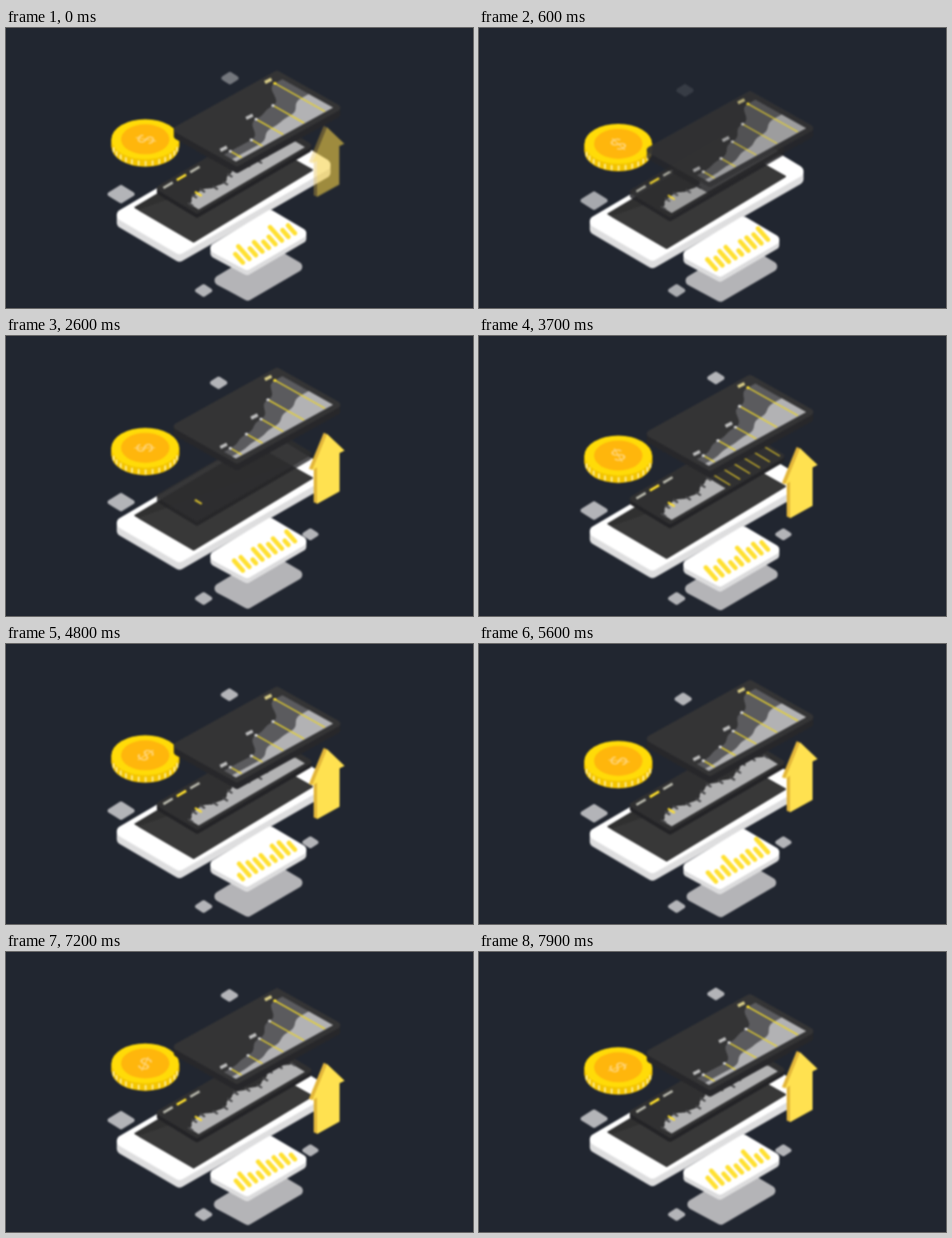
Animation, 560 px wide and 336 px high, one loop 8 s. Source, as an HTML page with a canvas:

```html
<!DOCTYPE html>
<html lang="en">
<head>
<meta charset="utf-8">
<title>Isometric phone</title>
<style>
  html, body { margin: 0; width: 560px; height: 336px; overflow: hidden; background: #212630; }
  canvas { display: block; filter: blur(.8px); }
</style>
</head>
<body>
<canvas id="stage" width="560" height="336"></canvas>
<script>
const c = document.getElementById('stage').getContext('2d');
const LOOP = 8000;
const ease = x => x * x * (3 - 2 * x);
const ramp = (t, a, b) => ease(Math.min(1, Math.max(0, (t - a) / (b - a))));
const wave = (t, crest, period) => Math.cos(2 * Math.PI * (t - crest) / period);
const range = (n, f) => Array.from({ length: n }, (_, i) => f(i));

function fade(alpha, draw, x = 0, y = 0) {
  if (alpha <= 0) return;
  c.save();
  c.globalAlpha *= alpha;
  c.translate(x, y);
  draw();
  c.restore();
}

function trace(points, r) {
  const n = points.length, [a, b] = [points[n - 1], points[0]];
  c.moveTo((a[0] + b[0]) / 2, (a[1] + b[1]) / 2);
  points.forEach((p, i) => c.arcTo(...p, ...points[(i + 1) % n], r));
  c.closePath();
}

function poly(points, fill, r = 0) {
  c.beginPath();
  trace(points, r);
  c.fillStyle = fill;
  c.fill();
}

// Extruded shape; its side is one path, so it stays even when translucent.
function slab(points, depth, face, side, r = 0, dx = 0, dy = 1) {
  c.beginPath();
  for (let d = depth; d > 0; d--) trace(points.map(([x, y]) => [x + d * dx, y + d * dy]), r);
  c.fillStyle = side;
  c.fill();
  poly(points, face, r);
}

function line(a, b, color, width) {
  c.beginPath();
  c.moveTo(...a);
  c.lineTo(...b);
  c.strokeStyle = color;
  c.lineWidth = width;
  c.stroke();
}

function oval(x, y, rx, ry, fill) {
  c.beginPath();
  c.ellipse(x, y, rx, ry, 0, 0, 7);
  c.fillStyle = fill;
  c.fill();
}

const plane = (o, U, V) => (u, v) => [o[0] + u * U[0] + v * V[0], o[1] + u * U[1] + v * V[1]];
const quad = (at, end = 1) => [at(0, 0), at(end, 0), at(end, 1), at(0, 1)];

// Filled curve over the base edge, level at each sample point.
function area(at, us, vs, fill, base) {
  c.beginPath();
  c.moveTo(...at(.04, base));
  c.lineTo(...at(.04, vs[0]));
  us.forEach((u, i) => {
    if (!i) return c.lineTo(...at(u, vs[0]));
    const mid = (us[i - 1] + u) / 2;
    c.bezierCurveTo(...at(mid, vs[i - 1]), ...at(mid, vs[i]), ...at(u, vs[i]));
  });
  c.lineTo(...at(.95, vs[vs.length - 1]));
  c.lineTo(...at(.95, base));
  c.fillStyle = fill;
  c.fill();
}

function tile(x, y, w, h, alpha) {
  fade(alpha, () => poly([[-w, 0], [0, -h], [w, 0], [0, h]], '#b3b4b8', 2.5), x, y);
}

function coin(t) {
  for (let d = 9; d > 0; d--) oval(0, d, 40.5, 24, '#f3c400');
  for (let a = .3; a < 2.9; a += .21) {
    const x = 40 * Math.cos(a), y = 24 * Math.sin(a);
    line([x, y + 2], [x, y + 8], '#fff0a0', 2);
  }
  oval(0, 0, 40.5, 24, '#ffdb08');
  oval(0, 0, 29, 18, '#ffb60c');
  c.scale(1, .68);
  c.rotate((t - 4050) * .0011);
  c.font = '27px Inter, Arial, sans-serif';
  c.textAlign = 'center';
  c.textBaseline = 'middle';
  c.fillStyle = '#ffd477';
  c.fillText('$', 0, 1);
}

function phone() {
  slab([[126, 241], [313, 131], [396, 181], [208, 289]], 9, '#fff', '#dededf', 7);
  poly([[153, 232], [297, 146], [369, 187], [225, 274]], '#303030', 1);
  poly([[158, 235], [339, 171], [369, 187], [225, 274]], '#383838', 1);
}

const CARD = [[-64, 11], [14, -36], [63, -7], [-14, 38]];

function card(t) {
  slab(CARD, 6, '#fff', '#dcdcdd', 6);
  c.lineCap = 'round';
  for (let i = 0; i < 9; i++) {
    const x = -19 + i * 7.8, y = 28 - i * 4.4;
    const h = 12 + 4 * Math.sin(i * 2.4 + t / 420) + 3 * Math.sin(i * 1.3 - t / 650);
    line([x, y], [x - h * .75, y - h * .85], '#ffe031', 5.4);
  }
  c.lineCap = 'butt';
}

const layerAt = plane([229, 226], [140, -82], [-51, -31]);
const layerU = range(13, i => .04 + i * .076);
const layerV = layerU.map(u => .33 + .12 * u + .08 * wave(u, .16, .33));

function layer(ink, wipe, grid) {
  const at = layerAt;
  slab(quad(at), 5, '#303031', '#232326', 3);
  fade(ink, () => {
    for (let i = 0; i < 3; i++) {
      const u = .04 + i * .115;
      line(at(u, .9), at(u + .08, .9), i === 1 ? '#ffe02d' : '#b9b9ad', 3);
    }
  });
  fade(grid, () => {
    for (let u = .46; u < 1; u += .085)
      if (u > wipe) line(at(u, .08), at(u, .5), '#cdb52b', 1.5);
  });
  c.save();
  c.beginPath();
  trace(quad(at, wipe), 0);
  c.clip();
  area(at, layerU, layerV, '#b3b3b4', .07);
  layerU.forEach((u, i) => line(at(u, layerV[i] + .04), at(u, layerV[i] - .08), '#48484a', 2.5));
  c.restore();
  line(at(.15, .46), at(.15, .3), '#ffe02d', 2.5);
}

const panelAt = plane([277, 167], [128, -71], [-80, -45]);
const panelU = range(5, i => .1 + i * .195);

function panel(t, grow) {
  const at = panelAt;
  const sway = .06 * wave(t, 4800, 3100);
  const values = panelU.map((_, i) =>
    grow * (.26 + .58 * (i / 4) ** 1.7 + (i % 4 ? sway * (-1) ** i : 0)));
  slab(quad(at), 8, '#343435', '#27272a', 4);
  area(at, panelU, values, '#5b5b5e', .08);
  area(at, panelU, values.map(v => v * .53), '#b2b2b4', .08);
  values.forEach((v, i) => {
    const [x, y] = at(panelU[i], v), top = i === 4;
    line([x, y], at(panelU[i], .09), '#ead42c', 1.5);
    oval(x, y, 2, 1.7, top ? '#ffe22e' : '#d8d8d8');
    if (i % 2 === 0) line([x - 12, y - 1], [x - 4, y - 5], top ? '#d6ca85' : '#bdbdbd', 4);
  });
}

function arrow() {
  const front = [[385, 0], [406, 20], [400, 23], [400, 69], [373, 84], [373, 40], [367, 44]];
  slab(front, 4, '#ffe150', '#e3b63a', 0, -1, -.4);
}

function draw(now) {
  const t = now % LOOP, closing = t < 1150;
  const late = closing ? t + LOOP : t;   // closing carries on from the end of the loop
  const shown = (a, b, d, e) => closing ? 1 - ramp(t, a, b) : ramp(t, d, e);
  const open = shown(450, 1050, 1300, 2000);
  const lift = (-11.7 - 5.2 * wave(t, 2450, 2600)) * open;
  const tiles = shown(500, 1100, 1200, 1700);
  const drift = shown(-900, 1100, 1200, 1700);

  c.fillStyle = '#212630';
  c.fillRect(0, 0, 560, 336);

  tile(263 + 22 * wave(late, 3900, 4200) - 38 * (1 - drift),
    58 - 8 * wave(late, 3500, 4200) + 22 * (1 - drift), 12.5, 8, drift);
  tile(138, 216 + lift, 18.5, 11.5, tiles);
  tile(237, 315, 12.5, 8, .3 + .7 * tiles);
  tile(365, 238, 12, 7.5, closing ? 0 : tiles);

  const size = 1 + lift * .0047;
  poly(CARD.map(([x, y]) => [303 + x * size, 293 + y * size]), '#b4b4b7', 6);

  const out = shown(650, 1100, 1200, 1900);
  fade(shown(650, 1050, 1200, 1500), () => coin(t),
    167 + 21 * (1 - out), 138.5 - 5 * wave(t, 4850, 2450) + 10 * (1 - out));

  fade(1, phone, 0, lift);
  fade(1, () => card(t), 303, 270 + lift);

  fade(shown(450, 1050, 1900, 2900),
    () => layer(ramp(late, 2600, 3300), ramp(late, 3000, 4400), ramp(late, 2800, 3500)),
    0, (lift + 7) * .3 + 12 * (1 - open));

  const rise = shown(350, 950, 1350, 1950);
  fade(shown(450, 950, 1350, 1750), () => panel(late, ramp(late, 1600, 2400)),
    0, -6.5 - 7 * wave(late, 2600, 3800) + 65 * (1 - rise));

  fade(closing ? .36 * (1 - ramp(t, 0, 300)) : ramp(t, 1450, 1900), arrow,
    0, 127.5 - 10 * wave(late, 2644, 2800) + 30 * (1 - shown(500, 900, 1450, 2100)));
}

function tick() {
  draw(performance.now());
  requestAnimationFrame(tick);
}
tick();
</script>
</body>
</html>
```
